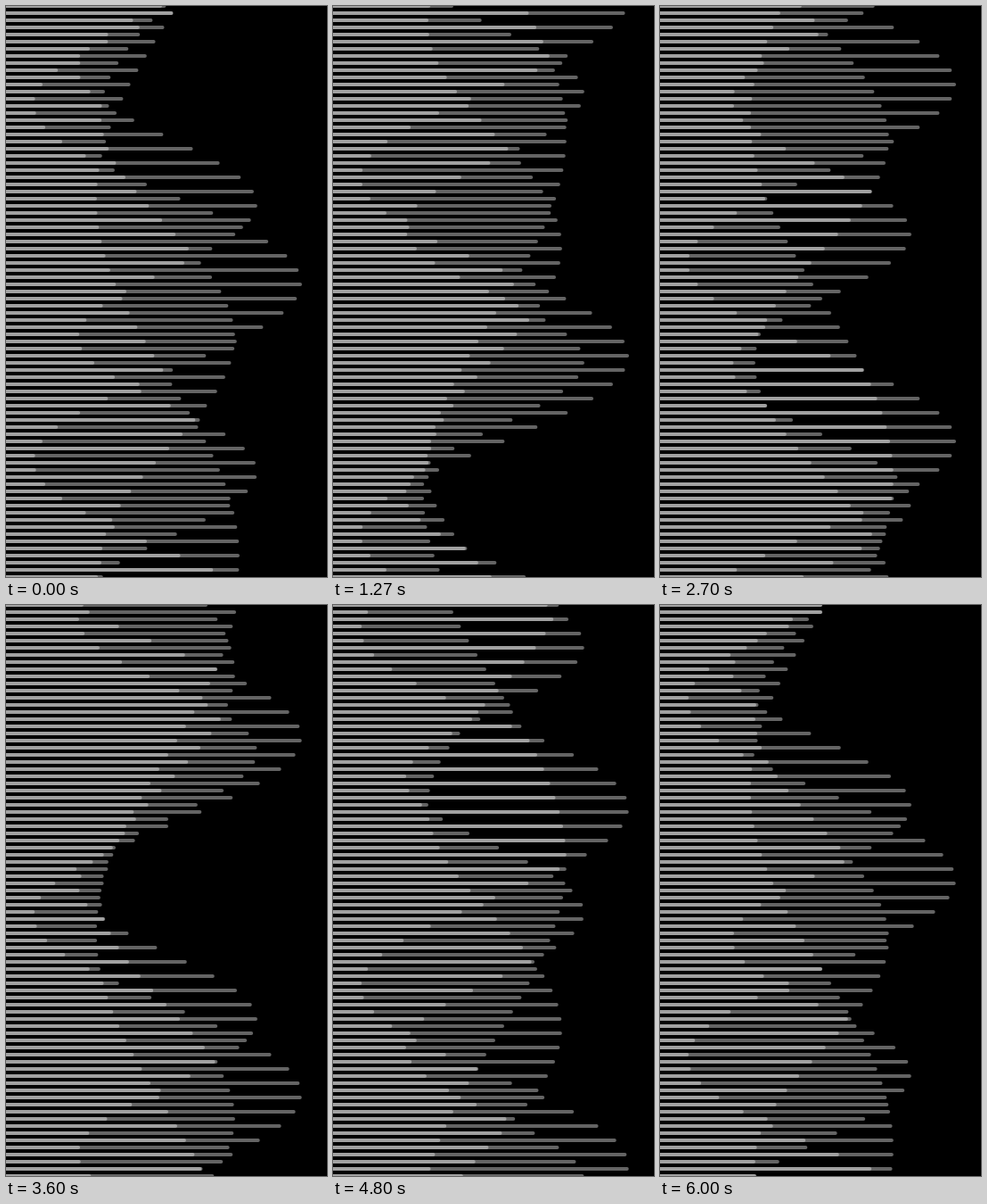
Write an HTML page with a canvas that moves like this. It is 360 px wide and 640 px high and loops after 6060 ms.

```html
<!DOCTYPE html>
<html lang="en">
<head>
<meta charset="utf-8">
<title>Line waves</title>
<style>
  html, body { margin: 0; width: 100%; height: 100%; overflow: hidden; background: #000; }
  canvas { display: block; width: 360px; height: 640px; }
</style>
</head>
<body>
<canvas id="stage" width="360" height="640"></canvas>
<script>
const ctx = document.getElementById('stage').getContext('2d');
const LOOP = 6060, STEPS = 180, ROW = 16;

// Travel per loop is a whole number of cycles; positive moves down.
const waves = [
  { top: 0, period: 300, amp: 100, cycles: -2 },
  { top: 0, period: 500, amp: 75, cycles: -1 },
  { top: 8, period: 400, amp: 150, cycles: 1 },
  { top: 8, period: 800, amp: 80, cycles: 2 }
];

// [ms, step]: the pace is nearly even, with two slight hesitations.
const pace = [[0, 1], [667, 21], [1267, 38], [1933, 58], [2133, 63], [2533, 76], [6000, 180]];

function stepAt(ms) {
  const t = Math.min(ms + 4, 6000);
  const i = pace.findIndex(([end], k) => k > 0 && t <= end);
  const [t0, s0] = pace[i - 1], [t1, s1] = pace[i];
  return Math.floor(s0 + (s1 - s0) * (t - t0) / (t1 - t0));
}

function drawWave({ top, period, amp, cycles }, progress) {
  for (let y = top; y <= 640; y += ROW) {
    const turn = (y - top) / period - cycles * progress;
    ctx.beginPath();
    ctx.moveTo(0, y);
    ctx.lineTo(180 - amp * Math.sin(2 * Math.PI * turn), y);
    ctx.stroke();
  }
}

function frame() {
  const progress = stepAt(performance.now() % LOOP) / STEPS;
  ctx.fillStyle = '#000';
  ctx.fillRect(0, 0, 360, 640);
  ctx.strokeStyle = 'rgba(255, 255, 255, 0.392)';
  ctx.lineWidth = 4;
  ctx.lineCap = 'round';
  waves.forEach(wave => drawWave(wave, progress));
  requestAnimationFrame(frame);
}
frame();
</script>
</body>
</html>
```
